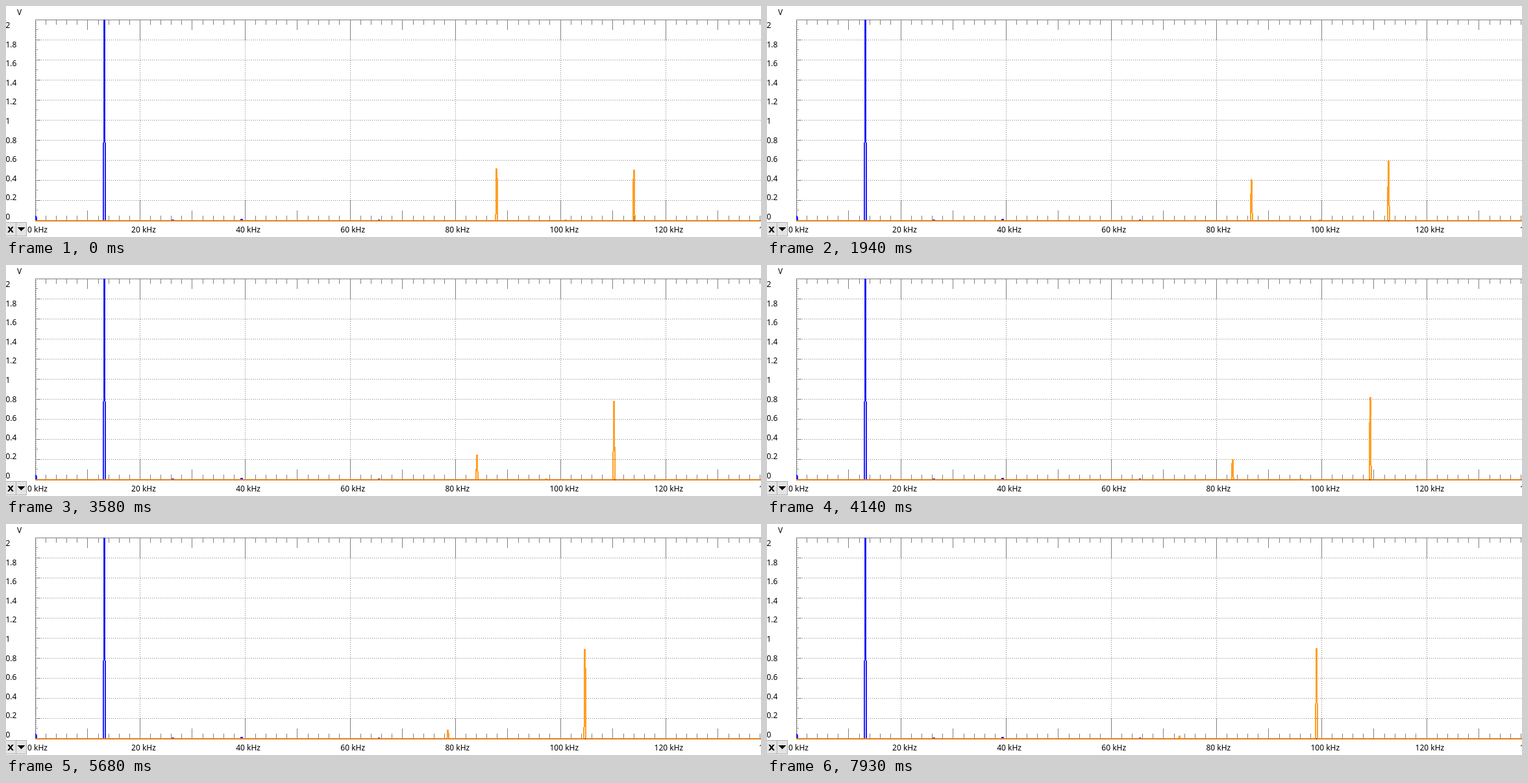
Animation, 1163 px wide and 357 px high, one loop 8000 ms. Source, as an HTML page:

```html
<!DOCTYPE html>
<html lang="en">
<head>
<meta charset="utf-8">
<title>Spectrum</title>
<style>
html, body { margin: 0; width: 100%; height: 100%; overflow: hidden; background: #fff; }
svg { display: block; }
text { font: 12px "Noto Sans", "Open Sans", sans-serif; fill: #000; }
.x { font: bold 13px "DejaVu Sans", sans-serif; }
</style>
</head>
<body>
<svg id="plot" width="1163" height="357" viewBox="0 0 1163 357" shape-rendering="crispEdges"></svg>
<script>
const LOOP = 8000, STEP = 70, LEFT = 45, TOP = 21, BASE = 332, WIDTH = 1118;
const GREY = '#808080', BLUE = '#2222fc', ORANGE = '#ff9f24';
const BIN = 1.29;     // width of one frequency bin
const GAP = 211.69;   // distance between the two orange peaks
const svg = document.getElementById('plot');

function add(tag, attrs, text) {
  const el = document.createElementNS('http://www.w3.org/2000/svg', tag);
  for (const k in attrs) el.setAttribute(k, attrs[k]);
  if (text) el.textContent = text;
  svg.append(el);
  return el;
}
const shape = (d, fill) => add('path', { d, fill });
const label = (x, y, text, cls = '') => add('text', { x, y, class: cls }, text);
const box = (x, y, w, h) => h > 0 ? `M${x} ${y}h${w}v${h}h${-w}z` : '';
const dotted = d => add('path', { d, stroke: GREY, 'stroke-dasharray': '1 2', fill: 'none' });
const tickSize = (j, unit) => unit * (j === 0 ? 4 : j === 5 ? 2 : 1);

function drawGrid() {
  let ticks = box(LEFT, TOP, WIDTH, 1) + box(LEFT, TOP, 1, BASE - TOP);
  for (let i = 0; i < 7; i++) {
    const x = Math.floor(LEFT + i * 161.85);
    if (i) dotted(`M${x + .5} ${TOP}V${BASE}`);
    for (let j = 0; j < 10; j++) {
      const tx = x + Math.floor(j * 16.185), len = tickSize(j, 8);
      ticks += box(tx, TOP, 1, len) + box(tx, BASE - len, 1, len);
    }
  }
  for (let i = 0; i < 10; i++) {
    const y = TOP + i * 31;
    if (i) dotted(`M${LEFT} ${y + .5}H1163`);
    for (let j = 0; j < 10; j++) ticks += box(LEFT, y + Math.floor(j * 3.1), tickSize(j, 2), 1);
  }
  shape(ticks, GREY);
}

function drawLabels() {
  label(17, 14, 'V');
  for (let i = 0; i <= 10; i++) label(-.5, 34 + i * 29.6, String((20 - 2 * i) / 10));
  label(33, 350, '0 kHz');
  for (let i = 1; i < 8; i++) label(32 + i * 161.1, 350, `${i * 20} kHz`);
  shape(box(0, 334, 32, 22), '#adadad');
  shape(box(0, 335, 15, 20) + box(16, 335, 15, 20), '#e3e3e3');
  label(2, 350, 'X', 'x');
  shape('M18 342h11l-5.5 6z', '#000');
}

// A peak falls into one bin and leaks into its neighbours, more so on the side it leans to.
function spike(at, height) {
  const bin = Math.round(at / BIN), lean = at / BIN - bin;
  const x = Math.floor(bin * BIN + .4);
  const top = Math.round(BASE - height);
  const l = Math.round(BASE - height * .39 * (1 - lean) ** 2);
  const r = Math.round(BASE - height * .39 * (1 + lean) ** 2);
  return box(x - 1, top, 3, 2) +
    box(x - 1, top, 2, l - top) + box(x - 2, l, 2, BASE - l) +
    box(x, top, 2, r - top) + box(x + 1, r, 2, BASE - r);
}

// Time and place of the upper orange peak as it is tuned downwards.
const tuning = [
  [870, 966.92], [1940, 956.92], [2850, 946.86], [4110, 928.37],
  [5650, 891.93], [6840, 873.67], [7890, 846.24]
];

function peakAt(t) {
  const i = Math.max(1, tuning.findIndex(p => p[0] >= t));
  const [t0, x0] = tuning[i - 1], [t1, x1] = tuning[i];
  return x0 + (x1 - x0) * Math.max(0, (t - t0) / (t1 - t0));
}

drawGrid();
drawLabels();
shape(spike(117 * BIN, BASE - TOP) + box(45, 324, 2, 8) + box(46, 326, 2, 6) +
  box(255, 330, 4, 2) + box(361, 329, 4, 3) + box(573, 330, 3, 2), BLUE);
const peaks = shape('', ORANGE);
shape(box(LEFT, 331, WIDTH, 2), '#e5801c');
const dot = shape('', '#4a2a10');

function draw(t) {
  const x = peakAt(Math.floor((t + 20) / STEP) * STEP - 20);
  const moved = tuning[0][1] - x;
  const high = 140 - 61 * Math.exp(-((moved / 26.5) ** 1.35));
  const low = 81 * Math.exp(-moved / 42);
  peaks.setAttribute('d', spike(x, high) + spike(x - GAP, low) +
    box(Math.round(x - GAP / 2) - 1, 330, 4, low > 25 ? 1 : 0));
  dot.setAttribute('d', box(Math.round(x), 331, 1, 2));
}

const start = performance.now();
function loop() {
  draw((performance.now() - start) % LOOP);
  requestAnimationFrame(loop);
}
loop();
</script>
</body>
</html>
```
